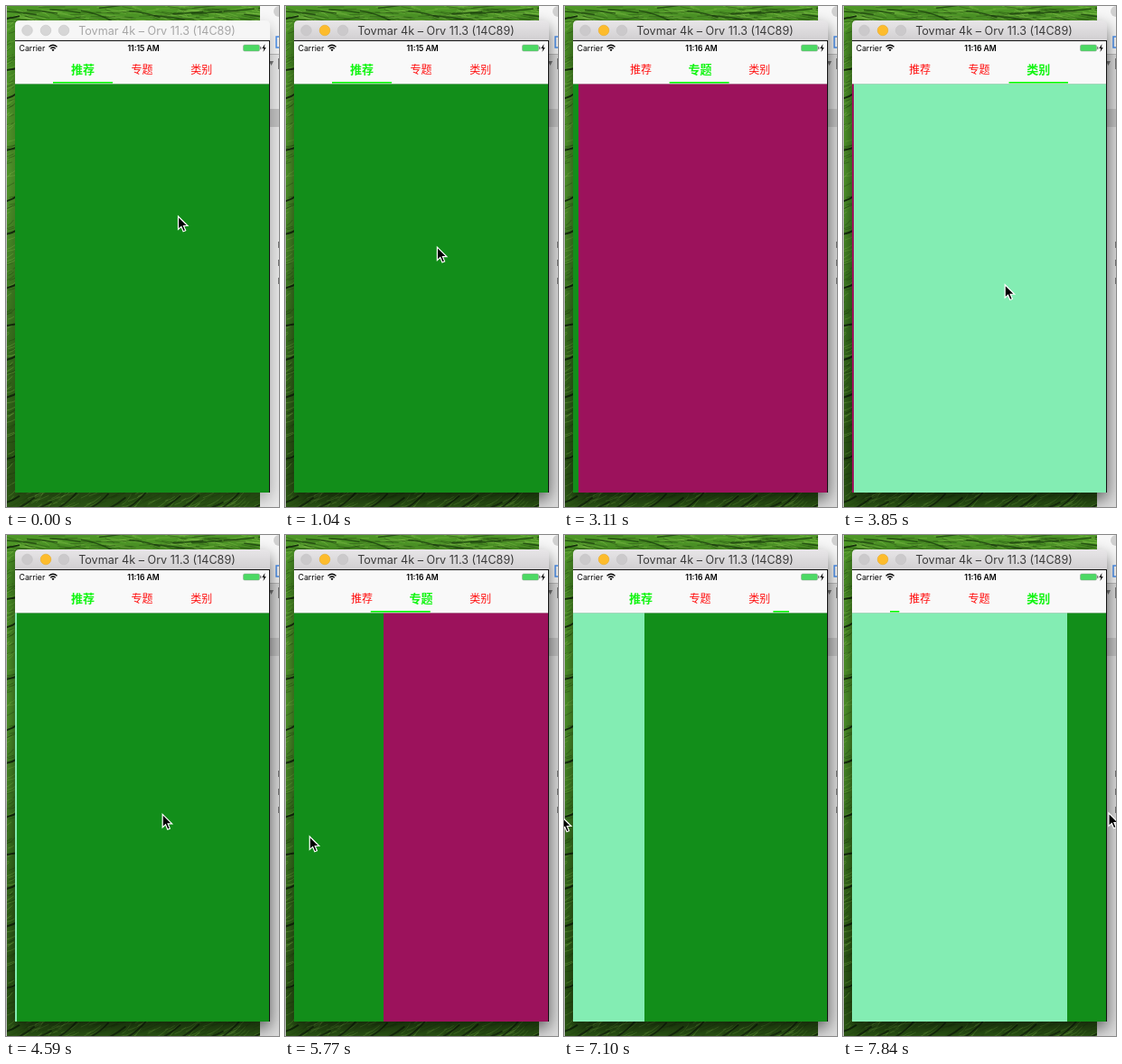
Recreate the animation shown at these times as an HTML page. Size 302 px wide and 555 px high, loop 7.99 s.

```html
<!DOCTYPE html>
<html lang="zh">
<head>
<meta charset="utf-8">
<style>
html, body { margin: 0; width: 100%; height: 100%; overflow: hidden; }
svg { display: block; width: 302px; height: 555px; font-family: Inter, Roboto, sans-serif; }
.tab { font: 12px "Noto Sans CJK SC", "Noto Sans CJK", sans-serif; fill: #f11; text-anchor: middle; }
.tab.on { font-size: 13px; font-weight: 700; fill: #12f512; }
#title { font-size: 12.6px; text-anchor: middle; fill: #a6a6a6; }
#lights { fill: #d6d6d6; stroke: #c6c6c6; stroke-width: .6; }
#bar { fill: #f6f6f6; }
#shadow { opacity: .3; }
#panel { fill: #e9e9e9; }
.active #title { fill: #3a3a3a; }
.active #bar { fill: url(#metal); }
.active #lights { fill: #cbc9cb; stroke: #c3c1c3; }
.active #mini { fill: #fdbc2c; stroke: #e8aa24; }
.active #shadow { opacity: .6; }
.active #panel { fill: #dcdcdc; }
</style>
</head>
<body>
<svg id="stage" viewBox="0 0 302 555">
  <defs>
    <linearGradient id="field" x2="0" y2="1">
      <stop offset="0" stop-color="#4d9626"/>
      <stop offset=".35" stop-color="#529a2c"/>
      <stop offset=".6" stop-color="#3f7d22"/>
      <stop offset=".85" stop-color="#305f17"/>
      <stop offset="1" stop-color="#2c5715"/>
    </linearGradient>
    <linearGradient id="metal" x2="0" y2="1">
      <stop offset="0" stop-color="#e8e6e8"/>
      <stop offset="1" stop-color="#d0ced0"/>
    </linearGradient>
    <filter id="blur" x="-20%" y="-20%" width="140%" height="140%"><feGaussianBlur stdDeviation="9"/></filter>
    <clipPath id="screen"><path d="M10 86.500H291V539H10Z"/></clipPath>
    <clipPath id="tabs"><path d="M52 80H249V88H52Z"/></clipPath>
  </defs>

  <path fill="url(#field)" d="M0 0H302V555H0Z"/>
  <g id="furrows" fill="none"></g>

  <path id="panel" d="M281 0H302V555H281Z"/>
  <path fill="#f7f7f7" d="M281 0H302V53H281Z"/>
  <path fill="#bbb" d="M281 53H302V54H281Z"/>
  <path fill="#c3c3c3" d="M281 114H302V134H281Z"/>
  <circle cx="302" cy="6" r="6" fill="#d0d0d0"/>
  <path fill="none" stroke="#4a90ee" stroke-width="1.500" d="M302 34H299V46H302"/>
  <path fill="#777" d="M291 61H296L293.500 66ZM301 58H302V70H301ZM301 261H302V268H301ZM301 281H302V288H301ZM301 301H302V308H301Z"/>
  <path fill="#ccc" d="M0 0H1V555H0Z"/>

  <rect id="shadow" x="10" y="24" width="282" height="522" filter="url(#blur)"/>
  <path id="bar" d="M10 39V21Q10 16 15 16H287Q292 16 292 21V39Z"/>
  <g id="lights">
    <circle cx="23.500" cy="27" r="5.800"/>
    <circle id="mini" cx="44" cy="27" r="5.800"/>
    <circle cx="64" cy="27" r="5.800"/>
  </g>
  <text id="title" x="167" y="31.500">Tovmar 4k – Orv 11.3 (14C89)</text>

  <path fill="#111" d="M10 38H292V539H10Z"/>
  <path fill="#f9f9f9" d="M10 39H291V86H10Z"/>
  <path fill="#c4c4c4" d="M10 86H291V87H10Z"/>
  <text x="14.500" y="49.500" font-size="8.800">Carrier</text>
  <g fill="none" stroke="#000" stroke-width="1.300">
    <path d="M47.500 45.300Q52 41.300 56.500 45.300M49.300 47.200Q52 44.800 54.700 47.200"/>
    <path stroke="none" fill="#000" d="M50.500 48.500Q52 47.200 53.500 48.500L52 50.200Z"/>
  </g>
  <text id="clock" x="152" y="49.500" font-size="8.600" font-weight="600" text-anchor="middle"></text>
  <rect x="262.500" y="43" width="18" height="7" rx="1.500" fill="#4cd964" stroke="#8a9a8c" stroke-width=".5"/>
  <path fill="#555" d="M281.300 45H282.300V48H281.300Z"/>
  <path d="M286.500 42L283.300 47H285.300L284.500 51L287.700 46H285.700Z"/>

  <g id="labels"></g>
  <g clip-path="url(#tabs)"><rect id="mark" y="84" width="66" height="1.600" fill="#0f0"/></g>
  <g id="pages" clip-path="url(#screen)"></g>
  <path id="cursor" stroke="#fff" stroke-width="1.200" d="M0 0V14.500L3.400 11.400L5.600 16.800L8.200 15.700L6 10.500H10.500Z"/>
</svg>
<script>
const $ = id => document.getElementById(id);
const LOOP = 7990, STEPS = 54, PAGE = 282, TAB = 66;
const RELEASE = .93; // part of a swipe during which the pointer drags the page

const swipe = (start, length, x, y, dir = 1) => ({ start, length, x, y, dir });
const swipes = [
  swipe(12.5, 9.3, 151, 294),
  swipe(22.2, 4, 200, 306),
  swipe(26.25, 5, 200, 308),
  swipe(36.6, 4, 210, 334),
  swipe(40.8, 4.56, 200, 320),
  swipe(45.4, 4, 200, 312),
  swipe(50, 4, 56, 308, -1)
];
const idle = { start: 0, x: 190.5, y: 233 };
const rest = { x: 172.5, y: 309 };

const ease = u => u * u * (3 - 2 * u);
const mix = (a, b, k) => a + (b - a) * k;

let seed = 7;
const random = (a, b) => {
  seed = seed * 16807 % 2147483647;
  return mix(a, b, seed / 2147483647);
};

function add(parent, tag, attrs, text = "") {
  const el = document.createElementNS("http://www.w3.org/2000/svg", tag);
  for (const k in attrs) el.setAttribute(k, attrs[k]);
  el.textContent = text;
  return $(parent).appendChild(el);
}

function furrow(x, y, length, rise, stroke, opacity, width) {
  const d = `M${x} ${y}q${length / 2} ${-rise * .2} ${length} ${-rise}`;
  add("furrows", "path", { d, stroke, opacity, "stroke-width": width });
}

// fine crop rows, then the dark borders between the fields
for (let n = 0; n < 150; n++) {
  const tone = n % 2 ? "#8fce55" : "#1c3a0c";
  furrow(random(-6, 4), random(0, 555), random(6, 14), random(2, 7), tone, .35, 1);
  furrow(random(0, 281), random(0, 18), random(10, 30), random(-8, 4), tone, .35, 1);
  furrow(random(0, 281), random(538, 562), random(8, 22), random(4, 12), tone, .25, 1);
}
for (let n = 0; n < 12; n++) {
  furrow(-3, n * 48 + random(0, 30), 18, random(3, 10), "#10230a", .9, 2);
  furrow(n * 26 + random(-8, 8), 560, 30, random(10, 24), "#10230a", .8, 1.8);
  furrow(n * 26 + random(-8, 8), random(0, 12), 34, random(-12, 6), "#183a0c", .7, 1.5);
}

const labels = ["推荐", "专题", "类别"].map((s, n) =>
  add("labels", "text", { x: 85 + n * 65.6, y: 75 }, s));
const pages = ["#128e1a", "#9c125c", "#83edb3"].map(fill =>
  add("pages", "rect", { y: 86, width: PAGE, height: 453, fill }));

function pose(step) {
  const n = swipes.findLastIndex(s => s.start <= step);
  const now = swipes[n], next = swipes[n + 1];
  const u = now ? Math.min(1, (step - now.start) / now.length) : 0;
  const moved = now ? now.dir * ease(u) : 0;
  const pos = Math.max(n, 0) + moved;
  // the marker leaves on the side it is dragged towards
  const mark = moved < 0 ? moved : pos % 3;

  if (now && u < RELEASE) return { pos, mark, x: now.x - PAGE * moved, y: now.y };
  const from = now ? rest : idle;
  const since = now ? now.start + RELEASE * now.length : idle.start;
  const k = (step - since) / (next.start - since);
  return { pos, mark, x: mix(from.x, next.x, k), y: mix(from.y, next.y, k) };
}

function draw(now) {
  const step = Math.min(STEPS - 1, Math.floor((now % LOOP + 12) / (LOOP / STEPS)));
  const { pos, mark, x, y } = pose(step);
  const current = Math.round(pos) % 3;

  $("stage").classList.toggle("active", step >= 2);
  $("clock").textContent = step < 18 ? "11:15 AM" : "11:16 AM";
  labels.forEach((el, n) => el.setAttribute("class", n == current ? "tab on" : "tab"));
  pages.forEach((el, n) => el.setAttribute("x", Math.round(10 + PAGE * ((n - pos + 7) % 3 - 1))));
  $("mark").setAttribute("x", 52 + TAB * mark);
  $("cursor").setAttribute("transform", `translate(${x} ${y})`);
}

const start = performance.now();
(function tick() {
  draw(performance.now() - start);
  requestAnimationFrame(tick);
})();
</script>
</body>
</html>
```
